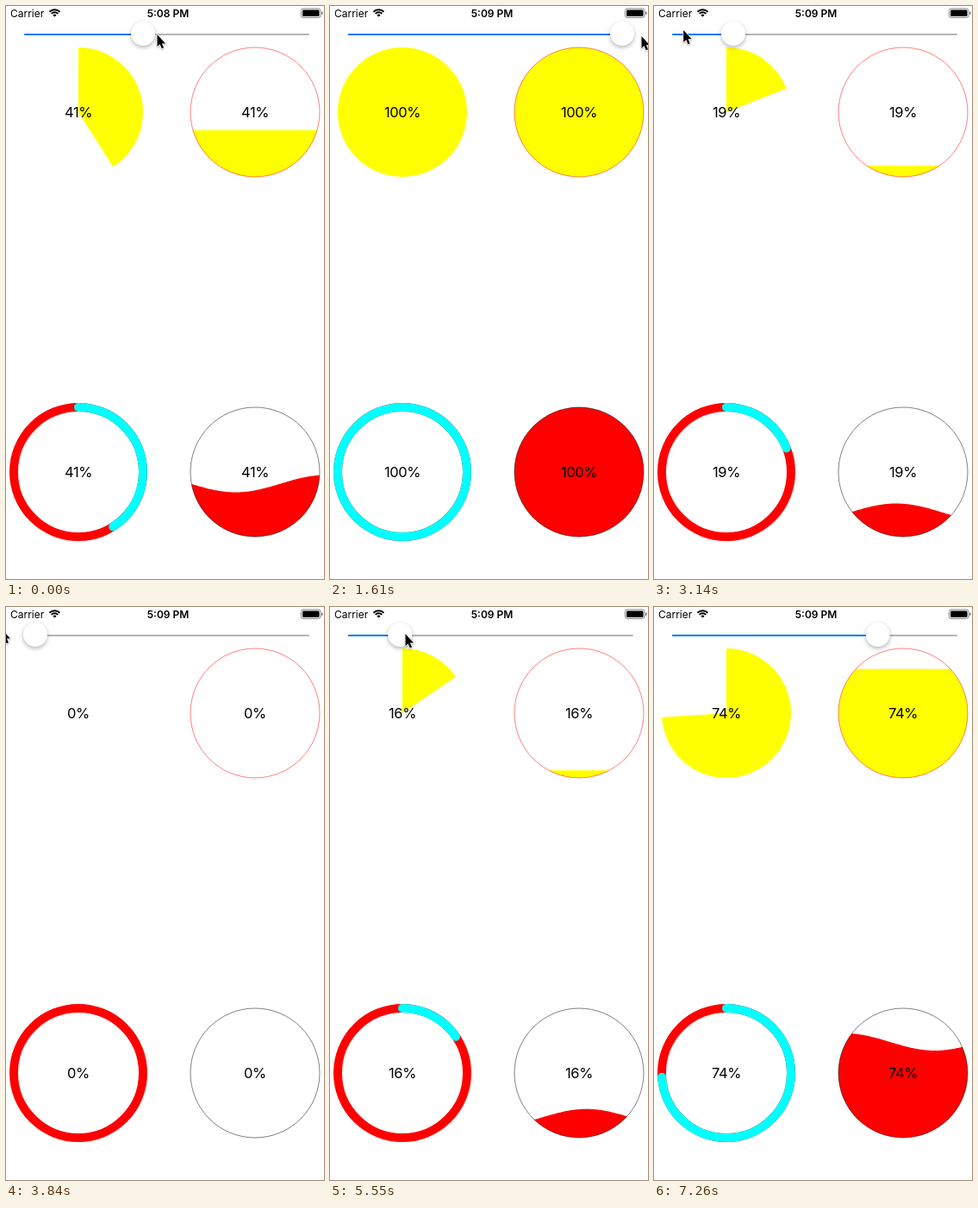
An HTML page with a canvas that plays this animation: 369 by 664 pixels, repeating every 7360 ms.

```html
<!DOCTYPE html>
<html lang="en">
<head>
<meta charset="utf-8">
<title>Progress views</title>
<style>
  html, body { margin: 0; width: 100%; height: 100%; overflow: hidden; background: #fff; }
  canvas { display: block; }
</style>
</head>
<body>
<canvas id="stage" width="369" height="664"></canvas>
<script>
const ctx = document.getElementById('stage').getContext('2d');
const LOOP = 7360, TAU = Math.PI * 2, TOP = -Math.PI / 2, R = 75;
const LEFT = 84, RIGHT = 289, UPPER = 123, LOWER = 540;
const FONT = 'Inter, "Liberation Sans", sans-serif';
const ARROW = new Path2D('M.5 0V14L3.6 11.2 5.8 16.2 8 15.2 5.9 10.4H10Z');

// Smooth step from 0 to 1 between two times
function ease(t, from, to) {
  const u = Math.min(1, Math.max(0, (t - from) / (to - from)));
  return u * u * (3 - 2 * u);
}

// The slider is dragged to the end, back to zero, then up again
function pose(t) {
  const up = ease(t, 240, 1070), down = ease(t, 2290, 3470), again = ease(t, 5330, 6080);
  const leave = ease(t, 6090, 6840), cross = ease(t, 4090, 4780);
  const p = .41 + .59 * up - down + .74 * again;
  const x = 175 + 174 * up + 26 * ease(t, 1000, 1350) - 14 * ease(t, 1530, 1610)
    - 404 * down + 38 * ease(t, 3800, 3840) + 246 * cross - 6 * ease(t, 4880, 4930)
    - 198 * ease(t, 4930, 5200) + 239 * again + 14 * leave;
  const y = 33 + 2 * ease(t, 240, 830) - 9 * ease(t, 1530, 3840) + 5 * cross + again + 640 * leave;
  return { p: Math.round(p * 1000) / 1000, x, y };
}

function arc(x, y, r, from = 0, to = TAU) {
  ctx.beginPath();
  ctx.arc(x, y, r, from, to);
}

function fill(color) {
  ctx.fillStyle = color;
  ctx.fill();
}

function stroke(color, width) {
  ctx.strokeStyle = color;
  ctx.lineWidth = width;
  ctx.stroke();
}

function box(x, y, w, h, r, color) {
  ctx.beginPath();
  ctx.roundRect(x, y, w, h, r);
  if (color) fill(color);
}

function shadow(alpha, blur, dy) {
  ctx.shadowColor = `rgba(0,0,0,${alpha})`;
  ctx.shadowBlur = blur;
  ctx.shadowOffsetY = dy;
}

function text(s, x, y, size, align = 'center', weight = 400) {
  ctx.font = `${weight} ${size}px ${FONT}`;
  ctx.textAlign = align;
  ctx.fillStyle = '#000';
  ctx.fillText(s, x, y);
}

function statusBar(t) {
  text('Carrier', 5, 12.5, 12, 'left');
  text(t < 1200 ? '5:08 PM' : '5:09 PM', 188, 12.5, 12, 'center', 600);

  for (const r of [8.4, 5.3, 1.5]) {
    arc(56.5, 12.6, r, TOP - .8, TOP + .8);
    stroke('#000', r < 2 ? 3 : 1.9);
  }

  box(342.5, 3, 22.5, 10.5, 2.5);
  stroke('#777', .9);
  box(344, 4.5, 19.5, 7.5, 1.3, '#000');
  box(366, 6.5, 1.5, 3.5, .8, '#777');
}

function slider(p) {
  const x = 34 + 305 * p;
  box(21, 32, 331, 2, 1, '#b5b5b5');
  if (p > 0) box(21, 32, x - 21, 2, 1, '#007aff');
  ctx.save();
  shadow(.3, 5, 2);
  arc(x, 32, 14);
  fill('#fff');
  ctx.restore();
}

function pie(p) {
  if (p <= 0) return;
  arc(LEFT, UPPER, R, TOP, TOP + TAU * p);
  ctx.lineTo(LEFT, UPPER);
  fill('#ff0');
}

function level(p) {
  arc(RIGHT, UPPER, R, Math.PI * (.5 - p), Math.PI * (.5 + p));
  if (p > 0) fill('#ff0');
  arc(RIGHT, UPPER, R);
  stroke('#f00', .5);
}

function ring(p) {
  arc(LEFT, LOWER, R);
  stroke('#f00', 10);
  if (p <= 0) return;
  ctx.lineCap = 'round';
  arc(LEFT, LOWER, R, TOP, TOP + TAU * p);
  stroke('#0ff', 10);
  ctx.lineCap = 'butt';
}

function wave(p, t) {
  const phase = t < 240 ? 0 : 3.69 + .00501 * (t - 830);
  const x0 = RIGHT - R, bottom = LOWER + R;
  if (p > 0) {
    ctx.save();
    arc(RIGHT, LOWER, R);
    ctx.clip();
    ctx.beginPath();
    ctx.moveTo(x0, bottom);
    for (let x = 0; x <= 2 * R; x++) {
      const y = p >= 1 ? LOWER - R : bottom - 2 * R * p + 10 * Math.sin(.03 * x + phase);
      ctx.lineTo(x0 + x, y);
    }
    ctx.lineTo(x0 + 2 * R, bottom);
    fill('#f00');
    ctx.restore();
  }
  arc(RIGHT, LOWER, R);
  stroke('#000', .5);
}

function labels(p) {
  ctx.letterSpacing = '-0.4px';
  for (const x of [LEFT, RIGHT]) {
    for (const y of [UPPER, LOWER]) text(Math.round(p * 100) + '%', x, y + 6, 16.5);
  }
  ctx.letterSpacing = '0px';
}

function cursor(x, y) {
  ctx.save();
  ctx.translate(x, y);
  ctx.lineJoin = 'round';
  ctx.strokeStyle = '#fff';
  ctx.lineWidth = 1.6;
  shadow(.3, 2, 1);
  ctx.stroke(ARROW);
  shadow(0, 0, 0);
  ctx.fillStyle = '#000';
  ctx.fill(ARROW);
  ctx.restore();
}

function draw(t) {
  const { p, x, y } = pose(t);
  ctx.fillStyle = '#fff';
  ctx.fillRect(0, 0, 369, 664);
  statusBar(t);
  pie(p);
  level(p);
  ring(p);
  wave(p, t);
  labels(p);
  slider(p);
  cursor(x, y);
}

const start = performance.now();
function frame() {
  draw((performance.now() - start) % LOOP);
  requestAnimationFrame(frame);
}
frame();
</script>
</body>
</html>
```
